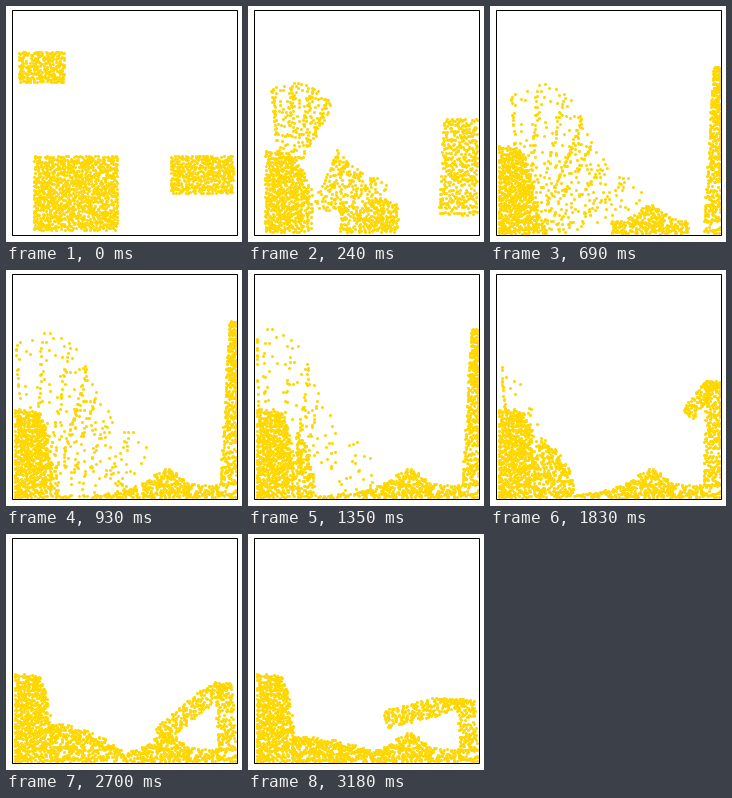
Animation, 236 px wide and 236 px high, one loop 3.21 s. Source, as a matplotlib script:

```python
import numpy as np
import matplotlib.pyplot as plt
from matplotlib.animation import FuncAnimation
from matplotlib.patches import Rectangle

SIZE, DPI = 236, 100
FRAMES, INTERVAL = 107, 30
CRASH = 15          # step at which the blocks have burst into a splash
GRAVITY = 0.15
FLOOR = 228
SPREAD = 6.1        # area per drop in the resting blocks
rng = np.random.default_rng(7)


def scatter(w, h, tries=3):
    """Fill a w x h block, keeping the loneliest of a few candidates."""
    n = int(w * h / SPREAD)
    pool = rng.random((n, tries, 2)) * (w, h)
    pts = pool[:, 0].copy()
    for i in range(1, n):
        gap = ((pool[i][:, None] - pts[:i]) ** 2).sum(2).min(1)
        pts[i] = pool[i, gap.argmax()]
    return (pts / (w, h)).T


def block(x, y, w, h):
    """Unit coordinates (v points up) and the places they stand for."""
    u, v = scatter(w, h)
    return u, v, np.array([x + u * w, y + (1 - v) * h])


def heap(u, v, x0, x1, height):
    """Spread drops evenly under the surface height(x)."""
    xs = np.linspace(x0, x1, 80)
    mass = np.cumsum(height(xs))
    x = np.interp(u, (mass - mass[0]) / (mass[-1] - mass[0]), xs)
    return np.array([x, FLOOR - v * height(x)])


def ramp(f, a, b):
    return np.clip((f - a) / (b - a), 0, 1)


# Three resting blocks; the big one is cut into pile, mound and spray.
ua, va, block_a = block(12.5, 45.5, 46, 31)
ub, vb, block_b = block(27.5, 149.5, 84, 75)
uc, vc, block_c = block(164.5, 149.5, 63, 38)
CUT = 0.56
in_pile = ub < CUT
in_mound = ~in_pile & (vb < CUT)
in_spray = ~in_pile & ~in_mound
side = (ub - CUT) / (1 - CUT)

pile_u, pile_v = ub[in_pile] / CUT, vb[in_pile]
mound_u, mound_v = side[in_mound], vb[in_mound] / CUT

# The spray bursts into a fan around the foot of the pile.
theta = np.concatenate([0.8 * ua - 0.15, 0.85 * side[in_spray] + 0.55])
theta += 0.035 * np.sin(28 * theta)
reach = np.sqrt(np.concatenate([va, (vb[in_spray] - CUT) / (1 - CUT)]))
radius = reach * (110 + 16 * np.cos(4.5 * (theta - 0.19)))
fan = np.array([45 + radius * np.sin(theta), FLOOR - radius * np.cos(theta)])
vx = -1.4
vy = -(2.8 + np.cos(theta)) * reach ** 3
flight = (-vy + np.sqrt(vy ** 2 + 2 * GRAVITY * np.maximum(205 - fan[1], 8))) / GRAVITY
landing = fan[0] + vx * flight
home_u = landing.argsort().argsort() / landing.size
home_v = rng.random(landing.size)


def pile(f):
    soft = 6 - 3 * ramp(f, CRASH, 31)
    return heap(pile_u, pile_v, 8, 56,
                lambda x: 88 / (1 + np.exp((x - 44) / soft)))


def mound(f):
    move = 30 * ramp(f, CRASH, 31)
    return heap(mound_u, mound_v, 106 + move, 183 + move,
                lambda x: 13 + 16 * np.exp(-((x - 160) / 18) ** 2))


def slump(f):
    """Landed spray: a bank that flows out from the pile."""
    q = np.clip((f - 45) / 61, -0.2, 1)
    width, top = 22 + 68 * q, 75 - 49 * q

    def surface(x):
        s = (x - 44) / width
        bank = np.where(s < 1, top * (1 - 0.7 * s ** 2), 0)
        return np.maximum(bank, 3 + 12 * ramp(x, 70, 138) ** 2)

    return heap(home_u, home_v, 44, 138, surface)


def spray(f):
    t = f - CRASH
    air = fan + np.array([vx * t + 0 * vy, vy * t + GRAVITY * t * t / 2])
    landed = np.clip(t / flight, 0, 1) ** 6
    air = np.clip(air, 8.5, FLOOR - 1)
    return air + (slump(f) - air) * landed


def column(f):
    """Jet up the right wall that bends over and falls to the left."""
    s = ramp(f, 50, 106)
    apex_y = min(50 + 0.09 * (f - 35) ** 2, 118 + 1.05 * (f - 61)) if f > 35 \
        else 50 + 0.075 * (f - 35) ** 2
    base = np.array([222, FLOOR])
    apex = np.array([227 - 10 * min(1, 2 * s), apex_y])
    bend = np.array([-80 * s ** 0.7, 190 * s * (1 - s) + 20 * s])
    stem, arm = np.linalg.norm(apex - base), np.linalg.norm(bend)
    along = vc * (stem + arm)
    up = np.clip(along / stem, 0, 1)
    over = np.maximum(along - stem, 0) / max(arm, 1e-6)
    spine = base[:, None] + np.outer(apex - base, up) + np.outer(bend, over)
    normal = np.array([-bend[1], bend[0]]) / max(arm, 1e-6)
    turn = np.clip(over * 3, 0, 1)
    across = np.outer([1, 0], 1 - turn) + np.outer(-normal, turn)
    width = 18 - 10 * (1 - min(1, 3 * s)) * vc
    return spine + across * (uc - 0.5) * width


def liquid(f):
    return np.hstack([pile(f), mound(f), spray(f), column(f)])


rest = np.hstack([block_b[:, in_pile], block_b[:, in_mound],
                  block_a, block_b[:, in_spray], block_c])


def drops(f):
    if f < CRASH:
        pts = rest + (liquid(CRASH) - rest) * f / CRASH
    else:
        pts = liquid(f)
    return np.clip(pts, 8.5, [[229.5], [FLOOR - 0.5]])


fig = plt.figure(figsize=(SIZE / DPI, SIZE / DPI), dpi=DPI, facecolor="white")
ax = fig.add_axes([0, 0, 1, 1])
ax.set(xlim=(0, SIZE), ylim=(SIZE, 0))
ax.axis("off")
px = 72 / DPI
fluid, = ax.plot([], [], "o", color="#ffd700", markersize=3 * px, markeredgewidth=0)
ax.add_patch(Rectangle((6.5, 4.5), 225, 225, fill=False, edgecolor="black",
                       linewidth=px, snap=False, zorder=5))


def update(f):
    fluid.set_data(*drops(f))
    return fluid,


anim = FuncAnimation(fig, update, frames=FRAMES, interval=INTERVAL,
                     repeat=True, repeat_delay=0)
plt.show()
```
